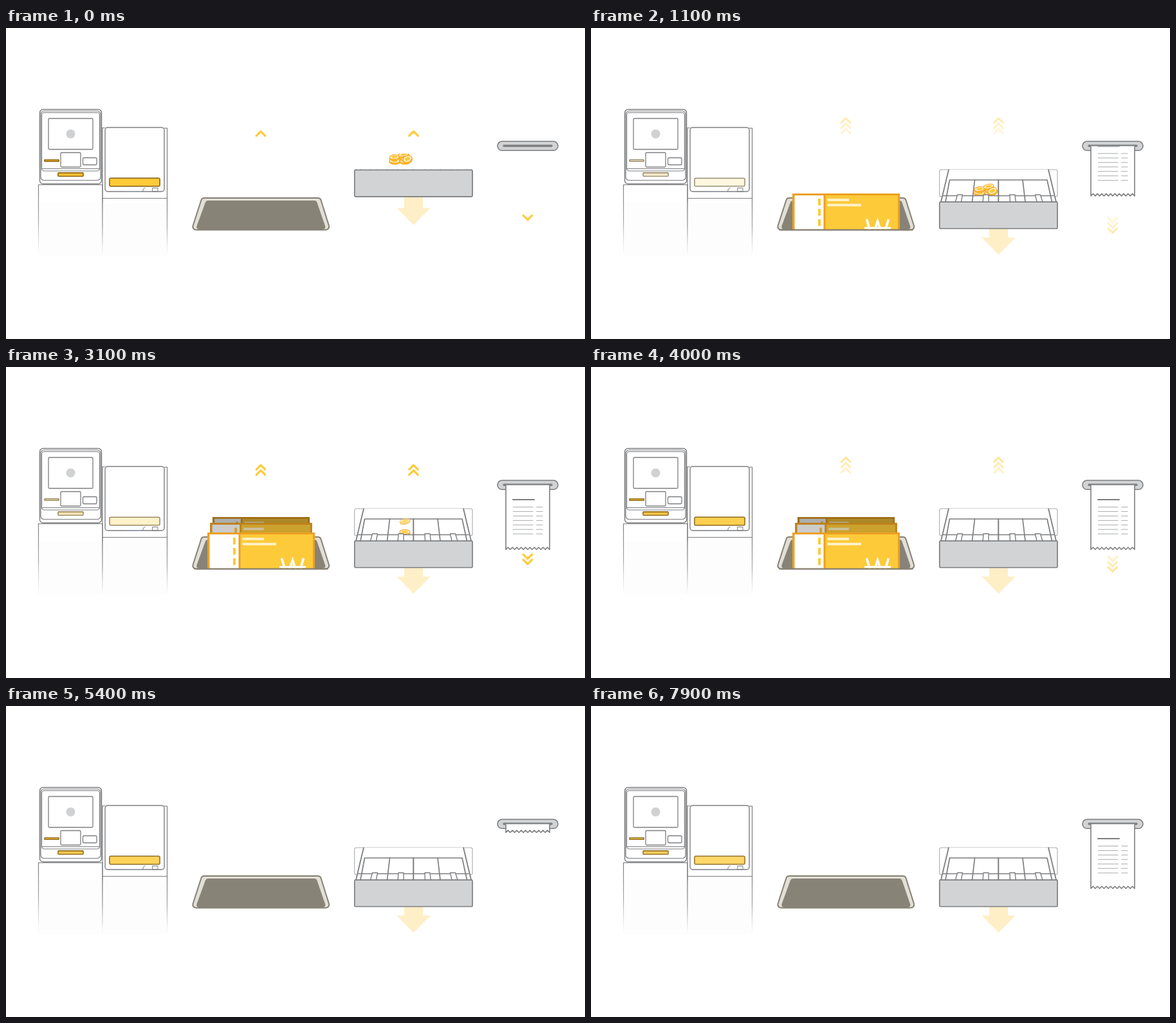
Write an HTML page with a canvas that moves like this. It is 900x483 px and loops after 8000 ms.

```html
<!DOCTYPE html>
<html lang="en">
<head>
<meta charset="utf-8">
<title>Kiosk payout</title>
<style>
  html, body { margin: 0; width: 100%; height: 100%; overflow: hidden; background: #fff; }
  canvas { display: block; }
</style>
</head>
<body>
<canvas id="stage" width="900" height="483"></canvas>
<script>
const LOOP = 8000;
const GRAY = '#7d7e80', PALE = '#a9abad', SILVER = '#d1d3d4';
const YELLOW = '#ffca38', CREAM = '#ffefc6', ORANGE = '#eda021';

const stage = document.getElementById('stage');
const main = stage.getContext('2d');
const layer = document.createElement('canvas');
layer.width = 900;
layer.height = 483;
const layerCtx = layer.getContext('2d');
let c = main;

const clamp = x => Math.max(0, Math.min(1, x));
const span = (t, from, to) => clamp((t - from) / (to - from));
const smooth = u => 0.5 - 0.5 * Math.cos(Math.PI * u);
const easeOut = u => 1 - (1 - u) ** 3;

function paint(fill, stroke, width = 1.3) {
  if (fill) { c.fillStyle = fill; c.fill(); }
  if (stroke) { c.strokeStyle = stroke; c.lineWidth = width; c.stroke(); }
}

// Boxes and lines are given by their edges: left, top, right, bottom.
function box(l, t, r, b, radius, fill, stroke, width) {
  c.beginPath();
  c.roundRect(l, t, r - l, b - t, radius);
  paint(fill, stroke, width);
}

function line(points, stroke, width) {
  c.beginPath();
  points.forEach(([x, y]) => c.lineTo(x, y));
  paint(null, stroke, width);
}

function clipped(x, y, w, h, draw) {
  c.save();
  c.beginPath();
  c.rect(x, y, w, h);
  c.clip();
  draw();
  c.restore();
}

function roundedShape(points, radius) {
  const [first, last] = [points[0], points[points.length - 1]];
  c.beginPath();
  c.moveTo((first[0] + last[0]) / 2, (first[1] + last[1]) / 2);
  points.forEach((p, i) => {
    const next = points[(i + 1) % points.length];
    c.arcTo(p[0], p[1], next[0], next[1], radius);
  });
  c.closePath();
}

function glowSlot(l, t, r, b, radius, glow) {
  box(l, t, r, b, radius, '#fff', '#86807a');
  c.globalAlpha = glow;
  box(l, t, r, b, radius, YELLOW, '#8c6410', 1.4);
  c.globalAlpha = 1;
}

function cabinet(l, r, top) {
  const fade = c.createLinearGradient(0, top, 0, 354);
  fade.addColorStop(0, GRAY);
  fade.addColorStop(0.5, '#a5a6a8');
  fade.addColorStop(1, 'rgba(200,200,200,0)');
  c.fillStyle = '#fdfdfd';
  c.fillRect(l, 271, r - l, 84);
  line([[l, top], [l, 354]], fade, 1.2);
  line([[r, top], [r, 354]], fade, 1.2);
  line([[l, top], [r, top]], GRAY, 1.2);
}

function kiosk(t) {
  const glow = 0.55 + 0.45 * Math.cos(2 * Math.PI * t / 1890);
  cabinet(50.5, 150, 243.5);
  cabinet(150, 250.5, 264.5);

  box(52.5, 126.5, 148.5, 242, 5, '#fff', GRAY, 1.5);
  box(54, 129, 147, 236.5, 5, null, GRAY, 1.2);
  box(55.5, 131.5, 145.5, 222, 4, null, GRAY, 1.2);
  line([[56, 218.5], [145, 218.5]], GRAY, 1.2);
  box(66, 140.5, 135, 188.5, 1.5, '#fff', GRAY);
  c.beginPath();
  c.arc(100.5, 164.5, 7, 0, 7);
  paint('#d0d1d2');
  box(85, 193.5, 116, 216, 1.5, '#fff', GRAY);
  box(119.5, 201.5, 141, 212.5, 2, '#fff', GRAY);
  glowSlot(60, 204.7, 82, 207.2, 0.5, glow);
  glowSlot(81, 224.7, 120, 230.2, 1, glow);
  line([[82, 226.4], [119, 226.4]], 'rgba(140,100,16,.45)', 1);

  line([[150, 155], [154, 155]], GRAY, 1.2);
  line([[150, 155], [150, 264]], GRAY, 1.2);
  line([[246, 155.5], [250.5, 155.5], [250.5, 264]], GRAY, 1.2);
  box(154, 154.5, 246, 254, 4, '#fff', GRAY, 1.4);
  glowSlot(161, 233.3, 239, 245.7, 1.5, glow);
  line([[216, 248.3], [213.5, 250], [212.5, 254]], GRAY, 1);
  box(228, 248.5, 236, 254, 0, null, GRAY, 1);
  line([[184, 254], [211, 254]], '#9aa6b4', 1.2);
}

function tray() {
  roundedShape([[304.5, 264], [488.5, 264], [504, 313.5], [288.5, 313.5]], 5);
  paint('#e2dfd7', '#858073', 2);
  roundedShape([[311, 268], [482.5, 268], [498, 313], [294.5, 313]], 4);
  paint('#888377');
}

function bill(top, scale, shade) {
  const rect = (x, y, w, h, color) => {
    c.fillStyle = color;
    c.fillRect(x, y, w, h);
  };
  c.save();
  c.translate(396.5, top);
  c.scale(scale, scale);
  rect(-83.5, 0, 167, 83, ORANGE);
  rect(-80, 3, 45, 77, '#fff');
  rect(-32, 3, 112.5, 77, '#fdca3a');
  for (let y = 8; y < 56; y += 16) rect(-43.5, y, 4, 10.5, '#fdca3a');
  rect(-29, 8, 33.5, 4, '#fff0c4');
  rect(-29, 16, 52.5, 4, '#fff0c4');
  line([[32, 40], [40.5, 69], [49, 43], [57.5, 69], [66, 40]], '#fff', 3.6);
  line([[28.5, 53.5], [69.5, 53.5]], '#fff', 3);
  c.fillStyle = ORANGE;
  c.font = 'bold 20px "Liberation Sans", sans-serif';
  c.textAlign = 'center';
  c.fillText('000', -58, 72);
  rect(-83.5, 0, 167, 83, `rgba(0,0,0,${shade})`);
  c.restore();
}

function bills(t) {
  if (t < 250 || t > 4900) return;
  const leave = smooth(span(t, 4150, 4900));
  const lift = 72 * leave;
  const first = 257 + 57 * (1 - easeOut(span(t, 250, 1050)));
  const second = first - 15 * smooth(span(t, 1500, 2250));
  const third = first - 24 * smooth(span(t, 2050, 2750));
  c = layerCtx;
  c.clearRect(0, 0, 900, 483);
  clipped(280, 100, 230, 212.7, () => {
    if (t > 2050) bill(third - lift, 0.905, 0.32);
    if (t > 1500) bill(second - lift, 0.95, 0.2);
    bill(first - lift, 1, 0);
  });
  c = main;
  c.globalAlpha = 1 - leave;
  c.drawImage(layer, 0, 0);
  c.globalAlpha = 1;
  if (leave === 0) line([[293, 313.5], [500, 313.5]], '#858073', 2);
}

function coin(x, y, tilt, alpha, rx = 8, ry = 3.4) {
  if (alpha <= 0) return;
  c.save();
  c.globalAlpha = alpha;
  c.translate(x, y);
  c.rotate(tilt);
  c.beginPath();
  c.ellipse(0, 2, rx, ry, 0, 0, 7);
  paint(YELLOW, '#f5a623', 1.1);
  c.beginPath();
  c.ellipse(0, 0, rx, ry, 0, 0, 7);
  paint('#fff3d4', '#f5a623', 1.1);
  c.beginPath();
  c.ellipse(0, 0, rx * 0.62, ry * 0.55, 0, 0, 7);
  paint(YELLOW);
  c.restore();
}

function coins(t, shift) {
  const flying = (x, y, tilt, from, to) => {
    const u = span(t, from, to);
    coin(x, y - 27 * smooth(u), tilt - 0.5 * u, 1 - u);
  };
  const settle = smooth(span(t, 1200, 1700));
  clipped(545, 195, 175, 65, () => {
    c.translate(0, shift);
    flying(604, 256, 0.05, 1250, 2050);
    flying(604, 250, -0.1, 1150, 1950);
    flying(620, 256, 0, 3250, 3950);
    flying(620, 251, 0, 2750, 3500);
    const u = span(t, 2000, 2700);
    coin(618 + 2 * settle, 246 - 27 * smooth(u), -0.2 * (1 - settle) - 0.4 * u, 1 - u);
    coin(624, 253, -0.4, 1 - settle, 7, 5);
  });
}

function drawer(t) {
  const open = smooth(span(t, 0, 850));
  const front = 220.5 + 49.7 * open;
  const shift = front - 270.2;
  const tip = 306 + 46 * open;

  c.beginPath();
  [[619, 255], [648, 255], [648, tip - 26.5], [660, tip - 26.5], [633.5, tip],
   [607.5, tip - 26.5], [619, tip - 26.5]].forEach(([x, y]) => c.lineTo(x, y));
  paint(CREAM);

  box(541.7, 220, 725, 262, 3, '#fff', PALE, 1.1);
  clipped(541, 219.5, 185, Math.max(0, front - 219.5), () => {
    c.translate(0, shift);
    c.beginPath();
    [[556, 220], [711, 220], [723, 270], [544, 270]].forEach(([x, y]) => c.lineTo(x, y));
    paint('#fff');
    line([[556, 220], [544, 270]], GRAY, 1.8);
    line([[711, 220], [723, 270]], GRAY, 1.8);
    line([[551, 270], [557.5, 236], [709, 236], [716.5, 270]], GRAY, 1.7);
    line([[596.5, 236], [592.5, 270]], GRAY, 1.7);
    line([[633.3, 236], [633.3, 270]], GRAY, 2);
    line([[671, 236], [675, 270]], GRAY, 1.7);
  });
  coins(t, shift);
  clipped(541, 219.5, 185, Math.max(0, front - 219.5), () => {
    c.translate(0, shift);
    line([[547, 260.5], [719, 260.5]], GRAY, 1.6);
    [[569.5, 566], [610, 609], [651, 651.5], [690.5, 693.5]].forEach(([top, foot]) => {
      c.beginPath();
      [[foot, 272], [top, 259], [top + 8, 259], [foot + 9, 272]].forEach(([x, y]) => c.lineTo(x, y));
      paint('#fff', GRAY, 1.4);
    });
  });
  box(541.8, front, 725, front + 41.3, 1.5, SILVER, GRAY, 1.7);
}

function paper(dy, alpha) {
  c.save();
  c.globalAlpha = alpha;
  clipped(770, 183.5, 84, 150, () => {
    c.translate(0, dy);
    c.beginPath();
    c.moveTo(777, 183);
    c.lineTo(777, 283.5);
    for (let i = 1; i < 20; i++) c.lineTo(777 + 3.4 * i, i % 2 ? 280 : 283.5);
    c.lineTo(845, 283.5);
    c.lineTo(845, 183);
    paint('#fff', GRAY, 1.6);
    line([[788, 206], [821, 206]], GRAY, 2);
    for (let i = 0; i < 7; i++) {
      const y = 217.5 + 6.95 * i;
      line([[788, y], [819, y]], PALE, 1);
      line([[824.5, y], [834, y]], PALE, 1);
    }
  });
  c.restore();
}

function receipt(t) {
  box(764, 176, 858, 190.3, 7.2, SILVER, GRAY, 1.6);
  line([[774, 183], [848, 183]], GRAY, 3.4);
  if (t < 5000) {
    const fall = span(t, 4600, 5000);
    const feed = smooth(span(t, 0, 1600));
    if (feed > 0) paper(-102 * (1 - feed) + 30 * fall, 1 - fall);
  } else {
    paper(-102 * (1 - smooth(span(t, 5000, 6600))), 1);
  }
}

function chevrons(t, x, y, dir) {
  const phase = t % 3000;
  const drift = 4.2 * span(phase, 250, 1150);
  // Each: appears at, starts fading at, fade length.
  [[0, 100, 1250], [80, 300, 1100], [180, 450, 1050]].forEach(([from, fade, length], i) => {
    if (phase < from) return;
    const tip = y + dir * (8.2 * i + drift);
    c.globalAlpha = 1 - span(phase, fade, fade + length);
    line([[x - 6.8, tip - dir * 6.7], [x, tip], [x + 6.8, tip - dir * 6.7]], YELLOW, 3.2);
    c.globalAlpha = 1;
  });
}

function draw(now) {
  const t = now % LOOP;
  c = main;
  c.fillStyle = '#fff';
  c.fillRect(0, 0, 900, 483);
  c.lineJoin = c.lineCap = 'round';
  kiosk(t);
  tray();
  bills(t);
  drawer(t);
  receipt(t);
  chevrons(t, 396, 160.6, -1);
  chevrons(t, 633.5, 160.6, -1);
  chevrons(t, 810.8, 297.8, 1);
}

const start = performance.now();
function tick() {
  draw(performance.now() - start);
  requestAnimationFrame(tick);
}
tick();
</script>
</body>
</html>
```
